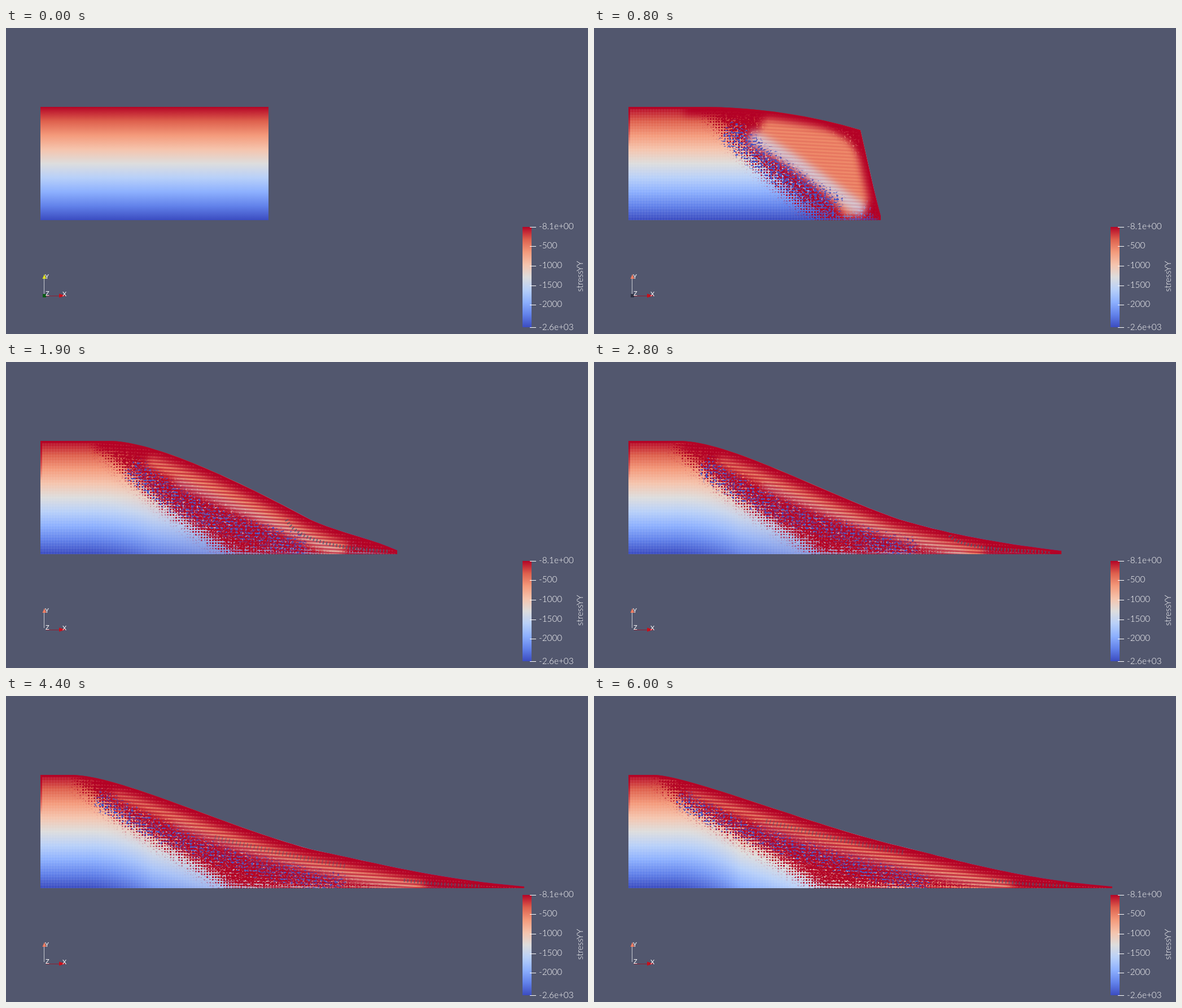
These frames come from a looping animation (1031x543 px, 6100 ms). An HTML page without scripts:

```html
<!DOCTYPE html>
<html lang="en">
<head>
<meta charset="utf-8">
<title>Slope collapse, stressYY</title>
<style>
html, body { margin: 0; width: 100%; height: 100%; overflow: hidden; background: #52576e; }
svg { display: block; width: 1031px; height: 543px; }
text { font-family: Lato, "Open Sans", sans-serif; font-size: 15.3px; font-weight: 300; fill: #fff; }
.axis text { font-size: 11px; font-weight: 400; }

.body, .slide, .strip, .pale, .core, .flow, .tilt, .edge, .toe, .rift, .rows, .zbox, .ytip {
  animation: 6.1s infinite;
}
.body { animation-name: body; }
.slide { animation-name: slide; }
.strip { animation-name: strip; }
.pale { animation-name: pale; }
.core { animation-name: core; }
.flow { animation-name: flow; }
.tilt { animation-name: tilt; }
.edge { animation-name: body, edge; }
.toe { animation-name: toe; }
.rift { animation-name: rift; }
.rows { animation-name: rows, ripen; }
.zbox { animation-name: zbox; }
.ytip { animation-name: ytip; }
.strip, .pale, .core, .edge, .toe, .rift { fill: none; }

/* the free surface; every 100 ms is one step */
@keyframes body {
  0% { d: path("M61 341V140H190C260 140 380 140 465 140C465 200 465 290 465 341V341"); animation-timing-function: steps(4); }
  6.55% { d: path("M61 341V140H190C270 140 383 142 467 150C470 208 473 290 476 339V341"); animation-timing-function: steps(4); }
  13.11% { d: path("M61 341V140H190C290 140 390 156 472 181C484 232 496 290 508 333V341"); animation-timing-function: steps(5); }
  21.31% { d: path("M61 341V140H184C280 139 400 176 505 227C532 263 555 300 587 333V341"); animation-timing-function: steps(6); }
  31.14% { d: path("M61 341V140H180C260 139 410 210 540 280C585 301 640 311 693 334V341"); animation-timing-function: steps(9); }
  45.9% { d: path("M61 341V140H150C240 140 400 230 540 279C630 306 720 322 828 335V341"); animation-timing-function: steps(8); }
  59.01% { d: path("M61 341V140H130C220 140 395 231 540 275C640 302 760 325 899 336V341"); animation-timing-function: steps(8); }
  72.13% { d: path("M61 341V140H115C200 140 385 230 540 272C670 300 770 325 918 338V341"); animation-timing-function: steps(16); }
  98.36%, 100% { d: path("M61 341V140H105C165 140 385 229 540 266C660 296 760 325 918 338V341"); }
}
@keyframes slide {
  0% { d: path("M200 135C260 195 330 275 425 343H940V135Z"); animation-timing-function: steps(8); }
  13.11% { d: path("M188 135C243 195 318 275 410 343H940V135Z"); animation-timing-function: steps(11); }
  31.14% { d: path("M150 135C228 205 303 280 412 343H940V135Z"); animation-timing-function: steps(17); }
  59.01% { d: path("M120 135C177 205 297 268 405 343H940V135Z"); animation-timing-function: steps(24); }
  98.36%, 100% { d: path("M108 135C142 200 302 260 405 343H940V135Z"); }
}
@keyframes strip {
  0% { d: path("M300 158C370 180 430 220 478 310"); stroke-width: 110px; animation-timing-function: steps(8); }
  13.11% { d: path("M300 164C360 190 425 220 485 312"); stroke-width: 92px; animation-timing-function: steps(11); }
  31.14% { d: path("M255 165C350 208 450 260 600 334"); stroke-width: 40px; animation-timing-function: steps(9); }
  45.9% { d: path("M225 164C340 216 440 276 690 337"); stroke-width: 34px; animation-timing-function: steps(8); }
  59.01% { d: path("M205 164C330 222 450 284 740 337"); stroke-width: 32px; animation-timing-function: steps(24); }
  98.36%, 100% { d: path("M170 162C300 216 450 266 740 337"); stroke-width: 28px; }
}
@keyframes pale {
  0%, 13.11% { d: path("M275 192C340 222 400 272 478 326"); stroke-width: 24px; animation-timing-function: steps(11); }
  31.14% { d: path("M300 212C380 245 480 290 595 340"); stroke-width: 9px; animation-timing-function: steps(17); }
  59.01% { d: path("M300 226C390 265 500 310 720 341"); stroke-width: 5px; animation-timing-function: steps(24); }
  98.36%, 100% { d: path("M290 230C390 265 520 308 730 341"); stroke-width: 5px; }
}
@keyframes core {
  0%, 13.11% { d: path("M230 175C285 222 340 275 440 325"); stroke-width: 58px; animation-timing-function: steps(11); }
  31.14% { d: path("M215 180C280 235 350 290 540 332"); stroke-width: 54px; animation-timing-function: steps(17); }
  59.01% { d: path("M160 175C250 230 350 300 610 337"); stroke-width: 48px; animation-timing-function: steps(24); }
  98.36%, 100% { d: path("M145 175C250 240 370 285 600 337"); stroke-width: 46px; }
}
@keyframes flow {
  0% { opacity: 0; animation-timing-function: steps(4); }
  6.55% { opacity: .7; animation-timing-function: steps(4); }
  13.11%, 100% { opacity: 1; }
}
@keyframes tilt {
  0%, 13.11% { opacity: 0; animation-timing-function: steps(11); }
  31.14% { opacity: .5; animation-timing-function: steps(41); }
  98.36%, 100% { opacity: 1; }
}
@keyframes edge {
  0%, 13.11% { stroke-width: 28px; animation-timing-function: steps(11); }
  31.14%, 100% { stroke-width: 30px; }
}
@keyframes toe {
  0%, 21.31% { d: path("M490 270Q510 305 560 335"); opacity: 0; animation-timing-function: steps(6); }
  31.14% { d: path("M497 280Q520 328 680 336"); opacity: .8; animation-timing-function: steps(9); }
  45.9% { d: path("M630 308Q650 334 810 337"); opacity: .8; animation-timing-function: steps(8); }
  59.01%, 100% { d: path("M705 327Q750 334 840 337"); opacity: .7; }
}
@keyframes rift {
  0%, 45.9% { d: path("M500 295Q530 302 560 306"); opacity: 0; animation-timing-function: steps(8); }
  59.01% { d: path("M430 279Q490 293 560 305"); opacity: .5; animation-timing-function: steps(8); }
  72.13% { d: path("M370 251Q470 277 600 302"); opacity: .55; animation-timing-function: steps(16); }
  98.36%, 100% { d: path("M305 222Q420 254 550 278"); opacity: .6; }
}
@keyframes rows {
  0% { transform: none; animation-timing-function: steps(60); }
  98.36%, 100% { transform: translate(90px, 5px); }
}
@keyframes ripen {
  0%, 13.11% { opacity: .2; animation-timing-function: steps(11); }
  31.14%, 100% { opacity: .85; }
}
@keyframes zbox {
  0% { fill: #0b5a17; animation-timing-function: step-end; }
  1.63% { fill: #2f3142; animation-timing-function: step-end; }
  24.59%, 100% { fill: #52576e; }
}
@keyframes ytip {
  0% { fill: #dfe022; animation-timing-function: step-end; }
  1.63%, 100% { fill: #ee7d62; }
}
</style>
</head>
<body>
<svg viewBox="0 0 1031 543">
  <defs>
    <linearGradient id="map" gradientUnits="userSpaceOnUse" x1="0" y1="140" x2="0" y2="341">
      <stop offset="0" stop-color="#b40426"/>
      <stop offset=".125" stop-color="#de604d"/>
      <stop offset=".25" stop-color="#f49a7b"/>
      <stop offset=".375" stop-color="#f5c4ad"/>
      <stop offset=".5" stop-color="#ddd"/>
      <stop offset=".625" stop-color="#b8d0f9"/>
      <stop offset=".75" stop-color="#8db0fe"/>
      <stop offset=".875" stop-color="#6282ea"/>
      <stop offset="1" stop-color="#3b4cc0"/>
    </linearGradient>
    <linearGradient id="slant" href="#map" x1="286" y1="169" x2="214" y2="377"/>
    <linearGradient id="bar" href="#map" y1="353" y2="531"/>
    <linearGradient id="fade" gradientUnits="userSpaceOnUse" x1="140" y1="0" x2="260" y2="0">
      <stop offset="0" stop-color="#000"/>
      <stop offset="1" stop-color="#fff"/>
    </linearGradient>
    <linearGradient id="wall" x1="0" y1="0" x2="0" y2="1">
      <stop offset="0" stop-color="#b40426"/>
      <stop offset="1" stop-color="#b40426" stop-opacity="0"/>
    </linearGradient>
    <mask id="right" maskUnits="userSpaceOnUse" x="61" y="130" width="880" height="220">
      <rect x="61" y="130" width="880" height="220" fill="url(#fade)"/>
    </mask>

    <pattern id="mesh" width="5" height="5" patternUnits="userSpaceOnUse">
      <path d="M0 .5H5M.5 0V5" stroke="#fff" stroke-opacity=".07"/>
    </pattern>
    <pattern id="lines" width="10" height="6" patternUnits="userSpaceOnUse" patternTransform="rotate(3)">
      <path d="M0 1.5H10" stroke="#b40426" stroke-width="2.6" stroke-opacity=".8"/>
      <path d="M1 4.5h3M6 4.5h2" stroke="#f6b79c" stroke-opacity=".4"/>
    </pattern>

    <filter id="soft" filterUnits="userSpaceOnUse" x="-60" y="100" width="1020" height="280">
      <feGaussianBlur stdDeviation="7"/>
    </filter>
    <!-- soft shape broken up by a particle grid and noise -->
    <filter id="grit" filterUnits="userSpaceOnUse" x="-60" y="100" width="1020" height="280" color-interpolation-filters="sRGB">
      <feGaussianBlur in="SourceAlpha" stdDeviation="13" result="shape"/>
      <feFlood x="60" y="140" width="3" height="3"/>
      <feOffset x="60" y="140" width="5" height="5"/>
      <feTile/>
      <feGaussianBlur stdDeviation=".7" result="grid"/>
      <feTurbulence type="fractalNoise" baseFrequency=".2 .3" numOctaves="2" seed="4"/>
      <feColorMatrix values="0 0 0 0 0  0 0 0 0 0  0 0 0 0 0  2.6 0 0 0 -.7"/>
      <feOffset result="noise"><animate attributeName="dx" from="0" to="90" dur="6.1s" repeatCount="indefinite"/></feOffset>
      <feComposite in="grid" in2="noise" operator="arithmetic" k2=".6" k3=".55" result="grain"/>
      <feComposite in="shape" in2="grain" operator="arithmetic" k2="4" k3="4" k4="-4" result="cut"/>
      <feFlood flood-color="#b40426"/>
      <feComposite in2="cut" operator="in"/>
    </filter>
    <filter id="flecks" filterUnits="userSpaceOnUse" x="-60" y="100" width="1020" height="280" color-interpolation-filters="sRGB">
      <feGaussianBlur in="SourceAlpha" stdDeviation="10" result="shape"/>
      <feTurbulence type="fractalNoise" baseFrequency=".23 .33" numOctaves="2" seed="11"/>
      <feColorMatrix values="0 0 0 0 0  0 0 0 0 0  0 0 0 0 0  2.6 0 0 0 -.8"/>
      <feOffset result="noise"><animate attributeName="dx" from="0" to="90" dur="6.1s" repeatCount="indefinite"/></feOffset>
      <feComposite in="shape" in2="noise" operator="arithmetic" k2="4" k3="4" k4="-5.9" result="cut"/>
      <feFlood flood-color="#4458c8"/>
      <feComposite in2="cut" operator="in"/>
    </filter>

    <clipPath id="soil"><path class="body"/></clipPath>
    <clipPath id="moving"><path class="slide"/></clipPath>
  </defs>

  <rect width="1031" height="543" fill="#52576e"/>

  <g clip-path="url(#soil)">
    <rect x="61" y="139" width="870" height="203" fill="url(#map)"/>
    <g class="tilt">
      <rect x="61" y="139" width="870" height="203" fill="url(#slant)" mask="url(#right)"/>
    </g>
    <g class="flow">
      <rect x="61" y="140" width="400" height="201" fill="url(#mesh)"/>
      <rect x="61" y="140" width="3" height="70" fill="url(#wall)"/>
      <path class="slide" filter="url(#grit)"/>
      <path class="strip" stroke="#ef8a6b" filter="url(#soft)"/>
      <path class="pale" stroke="#d3d9ea" stroke-opacity=".85" filter="url(#soft)"/>
      <path class="core" stroke="#000" filter="url(#flecks)"/>
      <path class="edge" stroke="#b40426" stroke-dasharray="0 300 2000 0" filter="url(#soft)"/>
      <g clip-path="url(#moving)">
        <rect class="rows" x="-60" y="80" width="1040" height="290" fill="url(#lines)"/>
      </g>
      <path class="toe" stroke="#52576e" stroke-width="6" stroke-dasharray="2 4"/>
      <path class="rift" stroke="#52576e" stroke-width="9" stroke-dasharray="1.5 5"/>
      <path class="body" fill="none" stroke="#b40426" stroke-width="7" stroke-dasharray="0 201 2000 0"/>
    </g>
  </g>

  <g class="axis">
    <path d="M67.5 475V445" stroke="#c9cbd3"/>
    <path d="M68 475.5H96" stroke="#8e1f33"/>
    <path class="ytip" d="M68 437L71.500 445H64.500Z"/>
    <path d="M106 475L94 471.500V478.500Z" fill="#c8101c"/>
    <rect class="zbox" x="65" y="472" width="6" height="6"/>
    <text x="69" y="445">Y</text>
    <text x="70" y="475">Z</text>
    <text x="100" y="476">X</text>
  </g>

  <rect x="915" y="353" width="16" height="178" fill="url(#bar)"/>
  <path d="M928 353.500h11M928 387.500h11M928 422.500h11M928 457.500h11M928 491.500h11M928 531.500h11" stroke="#fff"/>
  <text x="944" y="357">-8.1e+00</text>
  <text x="944" y="391">-500</text>
  <text x="944" y="426">-1000</text>
  <text x="944" y="461">-1500</text>
  <text x="944" y="495">-2000</text>
  <text x="944" y="536">-2.6e+03</text>
  <text transform="translate(1022 468) rotate(-90)">stressYY</text>
</svg>
</body>
</html>
```
